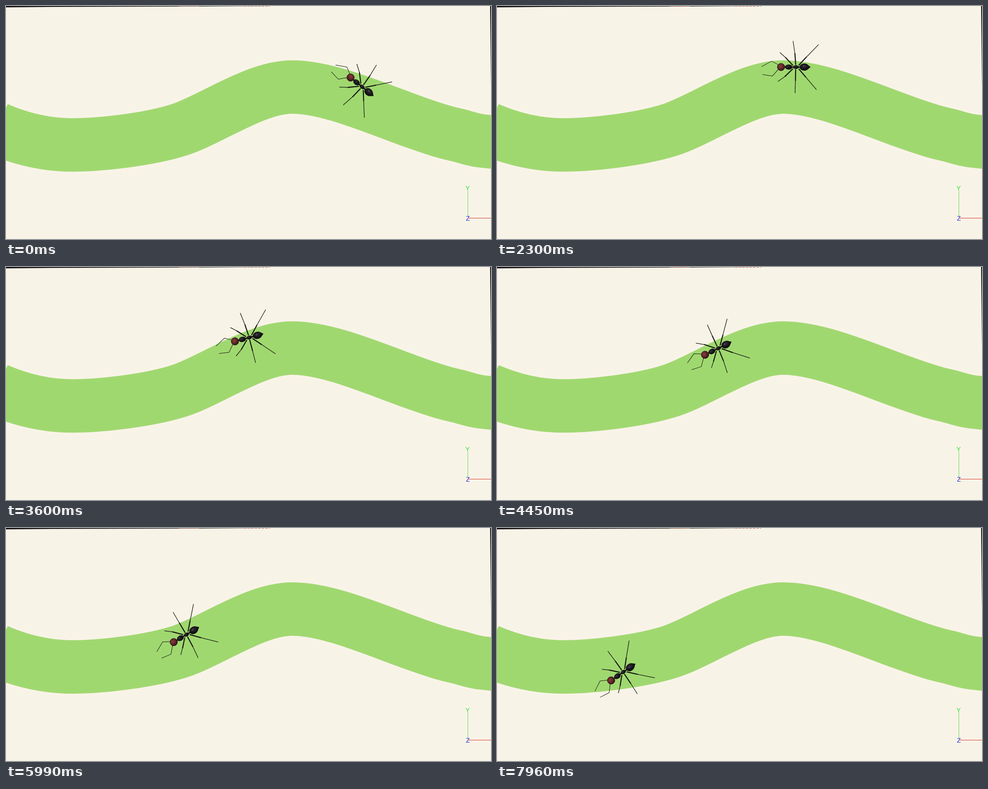
Recreate the animation shown at these times as an HTML page. Size 1080x519 px, loop 8 s.

```html
<!DOCTYPE html>
<html lang="en">
<head>
<meta charset="utf-8">
<title>Walking ant</title>
<style>
html, body { margin: 0; height: 100%; overflow: hidden; background: #f8f3e7; }
svg { display: block; width: 100vw; height: 100vh; }
text { font: 14px "Liberation Sans", Arial, sans-serif; text-anchor: middle; }
path { stroke-linejoin: round; }
</style>
</head>
<body>
<svg viewBox="0 0 1080 519">
  <defs>
    <radialGradient id="red" cx=".42" cy=".38" r=".65">
      <stop offset="0" stop-color="#85403f"/>
      <stop offset=".55" stop-color="#612528"/>
      <stop offset="1" stop-color="#2c1013"/>
    </radialGradient>
    <radialGradient id="dark" cx=".4" cy=".38" r=".65">
      <stop offset="0" stop-color="#35343a"/>
      <stop offset=".5" stop-color="#19151a"/>
      <stop offset="1" stop-color="#0b0a0b"/>
    </radialGradient>
  </defs>

  <path fill="none" stroke="#a0d870" stroke-width="119" d="M-20 273C35 297 90 309.500 149 309.500
    S315 298 385 276S555 180.500 637 180.500S826 229 911 259S985 281 1020 291.500S1060 300 1100 305"/>

  <!-- scene border -->
  <path fill="#171315" d="M0 0H590L430 1L258 1.500L105 2L0 3ZM1078 0H1080V180Z"/>
  <path stroke="#8d4a3c" d="M385 .5H430"/>
  <path stroke="#b5584c" stroke-dasharray="5 3" d="M530 .5H588"/>

  <!-- axes -->
  <path stroke="#62dc4e" d="M1028.500 412V469"/>
  <path stroke="#d8312c" d="M1029 472.500H1080"/>
  <text x="1028" y="411" fill="#2be02b">Y</text>
  <text x="1028.500" y="478" fill="#2733d8">Z</text>

  <g id="ant">
    <g fill="none" stroke="#14150f" stroke-linecap="round">
      <path id="thighs" stroke-width="2.300"/>
      <path id="shins" stroke-width="1.300"/>
      <path d="M-39 -5L-54 -13L-76 -1M-39 5L-52 20L-74 17"/>
    </g>
    <path stroke="#111" stroke-width="3" d="M-30 0H14"/>
    <path fill="url(#dark)" d="M33 0C28 3 26 8 19 8C12 8 8.500 4 8.500 0C8.500 -4 12 -8 19 -8C26 -8 28 -3 33 0Z"/>
    <ellipse rx="6" ry="4.200" fill="url(#dark)"/>
    <ellipse cx="-16" rx="8" ry="5.800" fill="url(#dark)"/>
    <circle cx="-33" r="8.300" fill="url(#red)" stroke="#1a0d0e" stroke-width=".8"/>
    <circle cx="17" cy="-2" r="1" fill="#77717a"/>
  </g>
</svg>
<script>
const LOOP = 8000, FRAME = 46.8, STRIDE = 1412;

// waypoints: time, x, y, heading in degrees
const route = [
  [0, 793, 180, 38.8],
  [1220, 726, 153, 20],
  [2300, 665, 136, 0],
  [3600, 542, 157, -15],
  [4220, 506, 174, -24],
  [5300, 443, 210, -31],
  [6700, 359, 267, -30],
  [7960, 281, 321, -34.6]
];

// knee and foot of the front, middle and rear leg, mirrored across the body
const legs = [[-23.5, 21, -37.5, 32], [-1.5, 30, -4, 57.5], [22.5, 22, 48, 50]];

const byId = id => document.getElementById(id);
const ant = byId("ant"), thighs = byId("thighs"), shins = byId("shins");

function slope(i, c) {
  const a = route[Math.max(i - 1, 0)], b = route[Math.min(i + 1, route.length - 1)];
  return (b[c] - a[c]) / (b[0] - a[0]);
}

// smooth curve through the waypoints for column c
function along(t, c) {
  const next = route.findIndex(p => p[0] > t);
  const i = (next < 0 ? route.length : next) - 1;
  if (next < 0) return route[i][c];
  const a = route[i], b = route[next], d = b[0] - a[0];
  const u = (t - a[0]) / d, v = 1 - u;
  return v * v * ((1 + 2 * u) * a[c] + u * d * slope(i, c))
       + u * u * ((1 + 2 * v) * b[c] - v * d * slope(next, c));
}

function draw(t) {
  const turn = along(t, 3);
  ant.setAttribute("transform", `translate(${along(t, 1)} ${along(t, 2)}) rotate(${turn})`);

  // two tripods swing in antiphase; one also leans with the turn
  const step = 3.2 * Math.cos(2 * Math.PI * t / STRIDE);
  const swing = [-step, step - 0.12 * turn];
  let upper = "", lower = "";
  legs.forEach(([kx, ky, fx, fy], n) => {
    for (const side of [-1, 1]) {
      const s = swing[(n + (side + 1) / 2) % 2];
      const knee = `${kx + s * 0.3} ${side * ky}`;
      upper += `M${kx * 0.3} ${side * ky * 0.2}L${knee}`;
      lower += `M${knee}L${fx + s} ${side * fy}`;
    }
  });
  thighs.setAttribute("d", upper);
  shins.setAttribute("d", lower);
}

const start = performance.now();
function tick() {
  const t = (performance.now() - start) % LOOP;
  draw(Math.floor((t + 10) / FRAME) * FRAME);
  requestAnimationFrame(tick);
}
tick();
</script>
</body>
</html>
```
